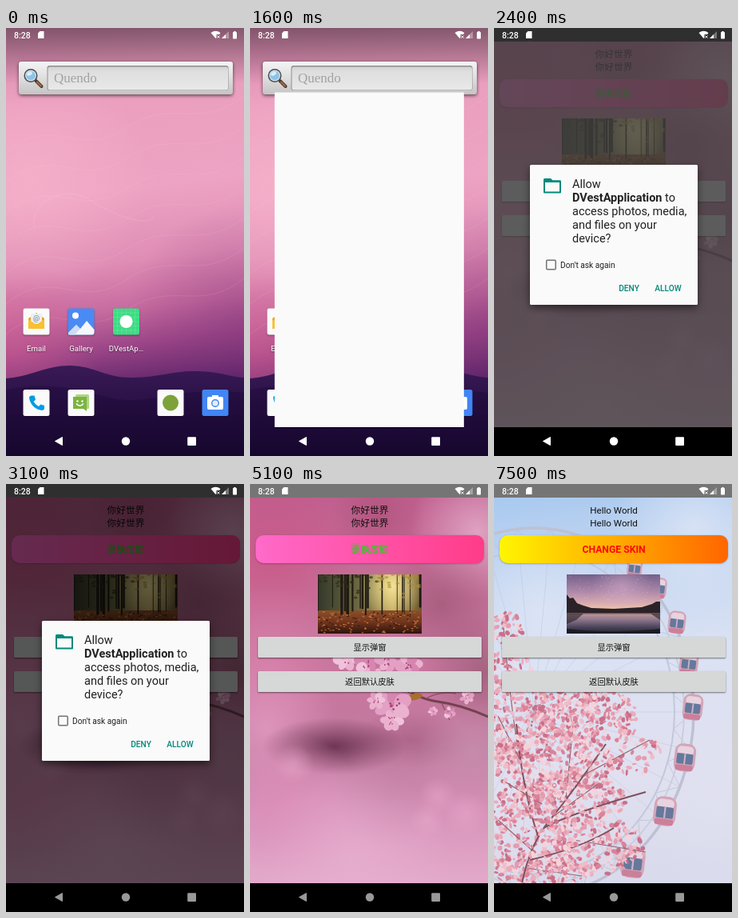
An HTML page with a canvas that plays this animation: 298x535 px, repeating every 8000 ms.

```html
<!DOCTYPE html>
<html lang="en">
<head>
<meta charset="utf-8">
<title>Skin switcher</title>
<style>
  html, body { margin: 0; width: 100%; height: 100%; overflow: hidden; background: #000; }
  canvas { display: block; width: 298px; height: 535px; }
</style>
</head>
<body>
<canvas id="stage"></canvas>
<script>
const W = 298, H = 535, LOOP = 8000;
const NAV_TOP = 499, STATUS_H = 17;
const SANS = 'Roboto, sans-serif';
const CJK = '"Noto Sans CJK SC", "Noto Sans CJK", sans-serif';
const TEAL = '#00897b';
const scale = window.devicePixelRatio || 1;
const TAU = Math.PI * 2;
let c;

function prepare(canvas) {
  canvas.width = W * scale;
  canvas.height = H * scale;
  const context = canvas.getContext('2d');
  context.scale(scale, scale);
  return context;
}

function cached(paint) {
  const canvas = document.createElement('canvas');
  c = prepare(canvas);
  paint();
  return canvas;
}

function show(image, alpha = 1) {
  c.globalAlpha = alpha;
  c.drawImage(image, 0, 0, W, H);
  c.globalAlpha = 1;
}

function random(seed) {
  return () => (seed = (seed * 16807) % 2147483647) / 2147483647;
}

function rect(x, y, w, h, fill) { c.fillStyle = fill; c.fillRect(x, y, w, h); }

function round(x, y, w, h, r, fill) {
  c.beginPath();
  c.roundRect(x, y, w, h, r);
  c.fillStyle = fill;
  c.fill();
}

function oval(x, y, rx, ry, fill, turn = 0) {
  c.beginPath();
  c.ellipse(x, y, rx, ry, turn, 0, TAU);
  c.fillStyle = fill;
  c.fill();
}

function dot(x, y, r, fill) { oval(x, y, r, r, fill); }

function poly(d, fill) { c.fillStyle = fill; c.fill(new Path2D(d)); }

function line(d, color, width = 1) {
  c.strokeStyle = color;
  c.lineWidth = width;
  c.stroke(new Path2D(d));
}

function fade(x0, y0, x1, y1, ...stops) {
  const g = c.createLinearGradient(x0, y0, x1, y1);
  stops.forEach(([at, color]) => g.addColorStop(at, color));
  return g;
}

function blob(x, y, r, rgb, alpha = 1, squash = 1) {
  c.save();
  c.translate(x, y);
  c.scale(1, squash);
  const g = c.createRadialGradient(0, 0, 0, 0, 0, r);
  g.addColorStop(0, `rgba(${rgb},${alpha})`);
  g.addColorStop(1, `rgba(${rgb},0)`);
  rect(-r, -r, 2 * r, 2 * r, g);
  c.restore();
}

function text(str, x, y, font, color, align = 'left') {
  c.font = font;
  c.fillStyle = color;
  c.textAlign = align;
  c.fillText(str, x, y);
}

function withShadow(color, blur, dy, draw) {
  c.save();
  c.shadowColor = color;
  c.shadowBlur = blur * scale;
  c.shadowOffsetY = dy * scale;
  draw();
  c.restore();
}

function clipped(x, y, w, h, draw) {
  c.save();
  c.beginPath();
  c.rect(x, y, w, h);
  c.clip();
  draw();
  c.restore();
}

// ---------- system bars ----------
function statusIcons() {
  const white = '#fff';
  text('8:28', 10, 13, '500 10.5px ' + SANS, white);
  poly('M42.5 4H47.5V13H40V6.5Z', white);
  poly('M256.5 6Q262.5 1.5 268.5 6L267 8H263.5V12L262.5 13Z', white);
  line('M264.5 9.5L267.5 12.5M267.5 9.5L264.5 12.5', white);
  poly('M279 4V13H270Z', 'rgba(255,255,255,.35)');
  poly('M275 8V13H270Z', white);
  round(284, 5, 5, 8.5, 0.8, white);
  rect(285.3, 4, 2.4, 1.5, white);
}

function navIcons(color) {
  c.lineJoin = 'round';
  poly('M61.5 516.5L70.5 511.5V521.5Z', color);
  line('M61.5 516.5L70.5 511.5V521.5Z', color);
  c.lineJoin = 'miter';
  dot(150, 516.5, 5.2, color);
  round(227.2, 511.2, 10.8, 10.8, 1, color);
}

// ---------- home screen ----------
function tile(x, y, fill = '#fafafa') {
  withShadow('rgba(0,0,0,.35)', 2, 1, () => round(x - 16.5, y - 16.5, 33, 33, 2.5, fill));
}

function searchBar() {
  withShadow('rgba(0,0,0,.6)', 4, 1.5, () =>
    round(16, 42, 268, 41, 3, fade(0, 42, 0, 83, [0, '#f4f4f4'], [.5, '#dedede'], [1, '#c4c4c4'])));
  round(51.5, 47, 227, 31, 3, '#8f8f8f');
  round(52.5, 48.5, 225.5, 29, 2.5, fade(0, 48, 0, 78, [0, '#cfcfcf'], [.2, '#dedede'], [1, '#e9e9e9']));
  text('Quendo', 60, 68, '17px "Liberation Serif", serif', '#a2a2a2');
  c.lineCap = 'round';
  line('M37.5 66L44.5 73', '#4b3a33', 4);
  line('M39 67.5L44 72.5', '#b06a3a', 2);
  c.lineCap = 'butt';
  dot(31, 59.5, 8.5, '#454c55');
  dot(31, 59.5, 7, '#d8e2e8');
  dot(31, 59.5, 5.8, '#8fc3e6');
  oval(29.5, 57, 3.5, 2.4, '#d9effb', -.5);
}

function homeIcons() {
  tile(38, 367);
  poly('M28 363L38 356L48 363V376H28Z', '#e9a21b');
  rect(31, 357, 14, 13, '#eceff1');
  text('@', 38, 366, '9px ' + SANS, '#607d8b', 'center');
  poly('M28 364L38 371L48 364V376H28Z', '#fbc02d');

  tile(94, 367, '#4a8af4');
  dot(87, 359.5, 4, '#fff');
  poly('M78 381L88 371L93 376L101 366L110.5 377V381Q110 383.5 108 383.5H80Z', '#f5f7fa');
  poly('M88 371L93 376L86 383.5H78V381Z', '#cfdcf5');

  tile(150.5, 367, '#3ddc84');
  for (let i = 1; i < 6; i++) {
    const d = i * 5.5;
    line(`M${134 + d} 350.5V383.5M134 ${350.5 + d}H167`, 'rgba(255,255,255,.22)', .6);
  }
  dot(150.5, 367, 8, '#fff');

  tile(38, 468.5);
  poly('M31.5 459.5H35.5L37 464.5L34.5 467Q37 471 41 473L43.5 470.5L48 472V476Q47.5 478 45 478C36 477 30 470 29 462Q29 460 31.5 459.5Z', '#039be5');

  tile(94, 468.5);
  round(87, 458, 17, 18, 1.5, '#aed581');
  poly('M84 461H101V479L97 476H84Z', '#7cb342');
  dot(89.5, 466.5, 1.2, '#fff');
  dot(95.5, 466.5, 1.2, '#fff');
  line('M88 469.5Q92.5 475 97 469.5', '#fff', 1.4);

  tile(206, 468.5);
  dot(206, 468.5, 10, '#7da23a');

  tile(262, 468.5, '#4285f4');
  round(252, 461, 20, 16, 2, '#fff');
  rect(258, 459, 8, 3, '#fff');
  dot(262, 469, 5, '#4285f4');
  dot(262, 469, 3.6, '#e3edfd');

  [['Email', 38], ['Gallery', 94], ['DVestAp…', 150.5]].forEach(([label, x]) =>
    withShadow('rgba(0,0,0,.5)', 2, .5, () => text(label, x, 404, '9.6px ' + SANS, '#fff', 'center')));
}

const home = cached(() => {
  rect(0, 0, W, H, fade(110, 0, 165, 450,
    [0, '#d987ac'], [.2, '#eb9fbf'], [.45, '#eda3c3'], [.65, '#df8db5'],
    [.78, '#c66b9f'], [.88, '#9c4688'], [1, '#5c2468']));
  blob(30, 190, 150, '250,185,205', .55);
  blob(298, 370, 150, '125,50,120', .4);
  blob(10, 400, 110, '215,95,145', .45);
  for (let i = 0; i < 7; i++) {
    const y = 120 + i * 38;
    line(`M0 ${y + 35}C60 ${y - 15} 90 ${y + 45} 150 ${y + 5}S240 ${y + 10} 298 ${y - 35}`,
      'rgba(255,205,222,.16)', .8);
  }
  line('M35 250C30 215 75 195 105 215S180 250 185 235', 'rgba(255,215,225,.2)');
  rect(0, 0, W, 70, fade(0, 0, 0, 70, [0, 'rgba(60,45,55,.55)'], [1, 'rgba(60,45,55,0)']));
  poly('M0 438C30 436 50 422 80 422S125 438 160 437S210 428 240 429S280 436 298 437V535H0Z',
    fade(0, 422, 0, 535, [0, '#3a1a55'], [.4, '#2a1147'], [1, '#16072b']));
  poly('M0 452C50 442 85 450 130 462S220 446 298 456V535H0Z', 'rgba(25,8,50,.35)');
  searchBar();
  homeIcons();
});

// ---------- app skins ----------
function blossom(x, y, r, rnd) {
  const turn = rnd() * TAU;
  for (let i = 0; i < 6; i++) {
    const a = turn + i * TAU / 6, d = r * (.4 + rnd() * .25);
    const fill = ['#f0c3da', '#e3a0c4', '#eab2cf', '#d686b0'][Math.floor(rnd() * 4)];
    oval(x + Math.cos(a) * d, y + Math.sin(a) * d, r * .48, r * (.25 + rnd() * .2), fill, a);
  }
  for (let i = 0; i < 7; i++)
    dot(x + (rnd() - .5) * r * .6, y + (rnd() - .5) * r * .6, r * .06, '#a93f70');
}

function pinkBackdrop() {
  rect(0, 0, W, NAV_TOP, fade(0, 17, 0, 499,
    [0, '#c0608f'], [.25, '#c67199'], [.5, '#c8779f'], [.65, '#c07a9f'], [.8, '#d690b7'], [1, '#e3aacb']));
  blob(25, 90, 110, '205,80,130', .6);
  blob(285, 60, 85, '228,172,202', .85);
  blob(160, 40, 60, '165,75,112', .5);
  blob(25, 215, 90, '217,130,172', .8);
  blob(240, 150, 75, '150,82,112', .6);
  blob(292, 235, 75, '150,92,116', .7);
  blob(20, 305, 90, '228,155,194', .8);
  blob(200, 320, 75, '155,85,118', .5, .5);
  blob(105, 328, 90, '96,42,70', .85, .4);
  blob(280, 335, 70, '200,145,175', .7);
  blob(50, 400, 90, '222,143,185', .7);
  blob(175, 385, 70, '190,125,160', .5);
  blob(130, 470, 120, '232,176,209', .7);
  [[235, 390, 24], [270, 412, 28], [222, 420, 22], [55, 350, 25]].forEach(([x, y, r]) => blob(x, y, r, '234,170,203', .5));
  line('M170 240Q205 268 235 272T298 291', '#744150', 3);
  line('M220 268Q240 258 258 262M240 274L250 295', '#8c5259', 1.3);
  oval(206, 266, 10, 4, '#a6712d', -.2);
  const rnd = random(12);
  [[120, 219, 16], [145, 225, 15], [172, 222, 15], [200, 226, 17], [158, 240, 11], [205, 248, 14],
   [180, 276, 23], [178, 296, 14], [158, 270, 12], [248, 252, 8], [272, 266, 9], [250, 286, 8], [229, 284, 6]]
    .forEach(([x, y, r]) => blossom(x, y, r, rnd));
}

function forest() {
  clipped(85, 113, 130, 74, () => {
    rect(85, 113, 130, 74, fade(85, 0, 215, 0, [0, '#34382a'], [.4, '#6c6a42'], [.72, '#c0a85e'], [1, '#665632']));
    blob(178, 128, 40, '250,232,155', .9);
    rect(85, 158, 130, 29, fade(0, 158, 0, 187, [0, '#8a5028'], [.5, '#71351d'], [1, '#2c140d']));
    const rnd = random(31);
    for (let i = 0; i < 20; i++) {
      const x = 85 + rnd() * 130;
      rect(x, 113, .7 + rnd() * 2.2, 40 + rnd() * 14, '#201a12');
    }
    for (let i = 0; i < 70; i++) {
      const x = 85 + rnd() * 130;
      oval(x, 113 + rnd() * rnd() * 32, 2.5, 1.4, x > 160 ? 'rgba(172,140,55,.6)' : 'rgba(50,46,26,.7)');
    }
    for (let i = 0; i < 160; i++)
      oval(85 + rnd() * 130, 160 + rnd() * 26, 1.4, .7, ['#b25a2c', '#3c190e', '#cc7b42'][i % 3]);
  });
}

const wheel = { x: 50, y: 285, rx: 200, ry: 230 };

function wheelPoint(angle, size = 1) {
  return [wheel.x + Math.cos(angle) * wheel.rx * size, wheel.y + Math.sin(angle) * wheel.ry * size];
}

function cabin(x, y, s) {
  c.save();
  c.translate(x, y);
  c.rotate(.12);
  c.scale(s, s);
  round(-13, -17, 26, 34, 9, '#d3a5b8');
  round(-10, -14, 20, 11, 5, '#e8d3df');
  round(-10, -5, 20, 13, 2, '#66789c');
  rect(-1, -5, 2, 13, '#c9b4c9');
  round(-11, 9, 22, 7, 3, '#cc7f99');
  c.restore();
}

function ferrisWheel() {
  for (let i = 0; i < 30; i++) {
    const a = i * TAU / 30;
    line(`M${wheel.x} ${wheel.y}L${wheelPoint(a)}`, 'rgba(180,190,214,.5)', .8);
    line(`M${wheelPoint(a)}L${wheelPoint(a + TAU / 60, .88)}L${wheelPoint(a + TAU / 30)}`, 'rgba(180,186,208,.7)', .9);
  }
  [[1, 3.5, '#bec1d3'], [.94, 1.8, '#c9cddd'], [.88, 2, '#c2c8da']].forEach(([size, width, color]) => {
    c.beginPath();
    c.ellipse(wheel.x, wheel.y, wheel.rx * size, wheel.ry * size, 0, 0, TAU);
    c.strokeStyle = color;
    c.lineWidth = width;
    c.stroke();
  });
  [[176, 105], [206, 130], [229, 173], [244, 224], [249, 279], [239, 342], [214, 409], [174, 473]]
    .forEach(([x, y], i) => cabin(x, y, .72 + i * .06));
}

function cherryTree() {
  const rnd = random(77);
  const colors = ['#e59cae', '#f0bcc8', '#d98399', '#ebabba', '#f5d2da', '#c97089'];
  // centre x, centre y, radius x, radius y, count
  const clusters = [[115, 290, 65, 38, 330], [32, 300, 42, 60, 290], [75, 350, 75, 42, 370],
    [95, 395, 70, 35, 210], [45, 430, 60, 60, 300], [125, 452, 65, 38, 230], [50, 485, 65, 22, 180],
    [175, 335, 35, 28, 50], [15, 180, 22, 20, 45], [20, 235, 30, 32, 80]];
  const bloom = (share) => clusters.forEach(([x, y, rx, ry, count]) => {
    for (let i = 0; i < count * share; i++) {
      const a = rnd() * TAU, d = Math.sqrt(rnd());
      oval(x + Math.cos(a) * d * rx, y + Math.sin(a) * d * ry,
        1.3 + rnd() * 3, 1 + rnd() * 2.2, colors[Math.floor(rnd() * 6)], rnd() * 3);
    }
  });
  bloom(.7);
  line('M35 499Q45 450 70 420T140 325M55 440Q35 380 28 300M62 430Q100 410 190 385M45 470Q110 455 150 430', '#80505c', 2);
  line('M30 330Q20 270 12 180M90 395L100 290M110 365L195 320M35 350L5 290M60 400L10 370M75 415L130 375M100 445L190 460M50 460L5 420M40 480L110 490',
    '#93656d', 1.2);
  bloom(.4);
}

function skyBackdrop() {
  rect(0, 0, W, NAV_TOP, fade(0, 17, 60, 499, [0, '#a9c9ef'], [.2, '#c3d6f1'], [.45, '#dbe2f3'], [.75, '#e0e0f0'], [1, '#d9daeb']));
  blob(250, 55, 100, '226,232,246', .7);
  blob(60, 160, 100, '228,233,247', .6);
  blob(290, 400, 110, '224,225,241', .7);
  ferrisWheel();
  cherryTree();
}

function lake() {
  clipped(91, 113, 117, 74, () => {
    rect(91, 113, 117, 46, fade(0, 113, 0, 159, [0, '#74608a'], [.45, '#ab86a8'], [.8, '#dbaeb0'], [1, '#f6cf9c']));
    blob(160, 128, 38, '218,174,203', .5);
    const rnd = random(9);
    for (let i = 0; i < 60; i++) dot(91 + rnd() * 117, 113 + rnd() * 34, .4, 'rgba(255,240,255,.7)');
    rect(91, 159, 117, 28, fade(0, 159, 0, 187, [0, '#d5a798'], [.35, '#937a90'], [.7, '#4d465c'], [1, '#24212e']));
    poly('M91 138L95 143L99 142L104 149L112 152L122 155L150 156L185 154L198 150L203 147L208 147V161H91Z', '#2b2228');
    rect(91, 160, 117, 2.5, 'rgba(35,28,36,.55)');
    poly('M91 162H112L103 170L91 175ZM208 162H196L208 170Z', 'rgba(38,30,38,.6)');
    poly('M91 187V181Q130 185 160 184T208 181V187Z', '#1c1a24');
  });
}

function plainButton(y, label) {
  withShadow('rgba(0,0,0,.5)', 2, 1, () => round(10, y, 280, 26, 1.5, '#d6d7d7'));
  text(label, 150, y + 17, '10.3px ' + CJK, '#111', 'center');
}

const pinkSkin = {
  backdrop: pinkBackdrop, photo: forest, hello: '你好世界', helloFont: '11.7px ' + CJK,
  action: '更换皮肤', actionFont: '500 11.7px ' + CJK, actionColor: '#0be00b', from: '#ff6ac9', to: '#ff3c88'
};
const skySkin = {
  backdrop: skyBackdrop, photo: lake, hello: 'Hello World', helloFont: '11.6px ' + SANS,
  action: 'CHANGE SKIN', actionFont: 'bold 12.2px ' + SANS, actionColor: '#ff0808', from: '#fff500', to: '#ff6500'
};

function appScreen(skin, lift) {
  return cached(() => {
    rect(0, 0, W, H, '#000');
    clipped(0, 0, W, NAV_TOP, skin.backdrop);
    rect(0, 0, W, STATUS_H, '#757575');
    text(skin.hello, 150, 37, skin.helloFont, '#111', 'center');
    text(skin.hello, 150, 53, skin.helloFont, '#111', 'center');
    withShadow('rgba(0,0,0,.3)', lift, lift / 3, () =>
      round(7, 64, 286, 35, 10, fade(7, 0, 293, 0, [0, skin.from], [1, skin.to])));
    text(skin.action, 150, 86, skin.actionFont, skin.actionColor, 'center');
    skin.photo();
    plainButton(191, '显示弹窗');
    plainButton(234, '返回默认皮肤');
  });
}

const pink = appScreen(pinkSkin, 1.5), pinkPressed = appScreen(pinkSkin, 2.2);
const sky = appScreen(skySkin, 1.5), skyPressed = appScreen(skySkin, 2.2);
const blank = cached(() => {
  rect(0, 0, W, H, '#000');
  rect(0, 0, W, NAV_TOP, '#fafafa');
  rect(0, 0, W, STATUS_H, '#757575');
});

// ---------- permission dialog ----------
function paintDialog(pressed) {
  withShadow('rgba(0,0,0,.5)', 10, 4, () => round(45, 171, 210, 175, 1.5, '#fafafa'));
  c.lineJoin = 'round';
  poly('M62 190Q62 188 64 188H71L73 190.5H82Q84 190.5 84 192.5V193H62Z', TEAL);
  line('M63 189.5H71L73 191.5H83V205.5H63Z', TEAL, 2);
  c.lineJoin = 'miter';
  const font = '14.5px ' + SANS, ink = '#212121';
  const lines = ['Allow', '', 'access photos, media,', 'and files on your', 'device?'];
  lines.forEach((s, i) => text(s, 98, 199.5 + i * 17.2, font, ink));
  text('DVestApplication', 98, 216.7, 'bold ' + font, ink);
  const nameWidth = c.measureText('DVestApplication').width;
  text(' to', 98 + nameWidth, 216.7, font, ink);
  c.strokeStyle = '#737373';
  c.lineWidth = 1.5;
  c.beginPath();
  c.roundRect(65.7, 290.2, 11.5, 11.5, 1);
  c.stroke();
  text("Don't ask again", 83, 300, '10.2px ' + SANS, ink);
  if (pressed) round(195.5, 312, 44.5, 26, 1.5, 'rgba(0,0,0,.1)');
  text('DENY', 169, 329, '500 10.2px ' + SANS, TEAL, 'center');
  text('ALLOW', 218, 329, '500 10.2px ' + SANS, TEAL, 'center');
}
const dialog = cached(() => paintDialog(false));
const dialogPressed = cached(() => paintDialog(true));

// ---------- timeline ----------
const mix = (a, b, p) => a + (b - a) * p;
const progress = (now, from, to) => Math.max(0, Math.min(1, (now - from) / (to - from)));

// launch window growing out of the app icon
function launch(now) {
  show(home);
  const p = progress(now, 1400, 1850);
  if (!p) return;
  const e = 1 - (1 - p) ** 2.5;
  const left = mix(134, 0, e), top = mix(350, 0, e);
  clipped(left, top, mix(167, W, e) - left, mix(383, H, e) - top, () => show(blank, Math.min(1, p * 2.5)));
}

// dim, opacity and drop of the dialog from each moment on
const dialogSteps = [
  [2300, .2, .5, 0], [2400, .6, 1, 0],
  [3600, .45, .94, 35], [3700, .22, .77, 149], [3800, 0, 0, 0]
];

function drawDialog(now) {
  const current = dialogSteps.filter(([start]) => start <= now).pop();
  if (!current || !current[2]) return;
  const [, dim, alpha, drop] = current;
  rect(0, 0, W, NAV_TOP, `rgba(0,0,0,${dim})`);
  clipped(0, 0, W, NAV_TOP, () => {
    c.translate(0, drop);
    show(now >= 3400 ? dialogPressed : dialog, alpha);
  });
}

function draw(time) {
  const now = Math.floor((time % LOOP) / 100) * 100;
  c.clearRect(0, 0, W, H);
  if (now < 2300) launch(now);
  else if (now < 5200) {
    show(blank);
    show(now >= 5100 ? pinkPressed : pink, progress(now, 2200, 2600));
  } else show(now < 5400 || now >= 7300 ? skyPressed : sky);
  drawDialog(now);
  statusIcons();
  navIcons(now < 2800 ? '#fff' : now < 2900 ? '#c4c4c4' : '#999');
}

c = prepare(document.getElementById('stage'));
let start;
function tick(time) {
  start ??= time;
  draw(time - start);
  requestAnimationFrame(tick);
}
draw(0);
requestAnimationFrame(tick);
</script>
</body>
</html>
```
